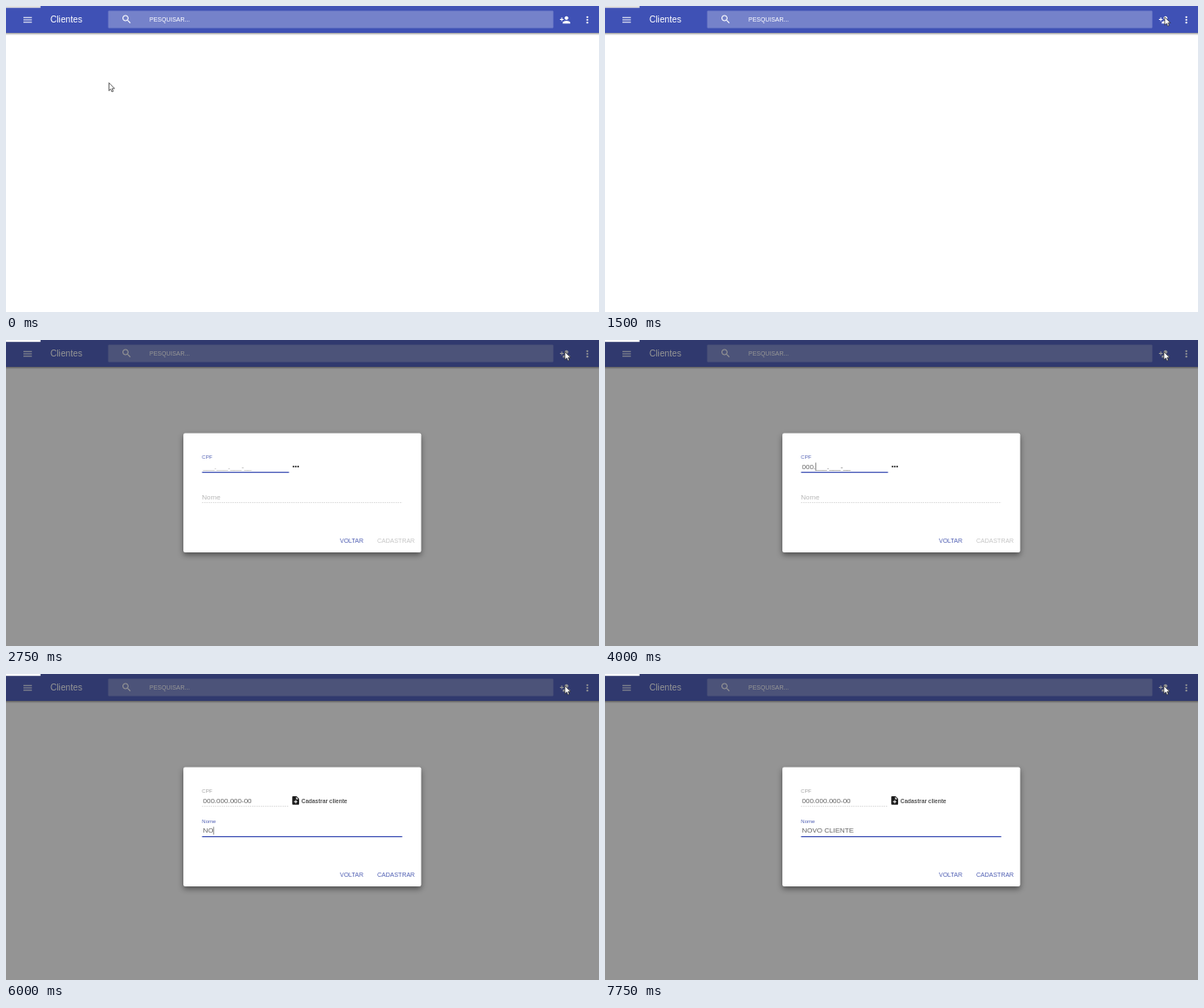
These frames come from a looping animation (682 by 353 pixels, 8 s). An HTML page:

```html
<!DOCTYPE html>
<html lang="pt-BR">
<head>
<meta charset="utf-8">
<title>Clientes</title>
<style>
  html, body { margin: 0; width: 100%; height: 100%; overflow: hidden; background: #fff; }
  svg { display: block; width: 100%; height: 100%; font: 8px "Liberation Sans", Arial, sans-serif; }
  .bar { fill: #3f51b5; filter: drop-shadow(0 1px 1.3px rgba(0, 0, 0, .5)); }
  .card { fill: #fff; filter: drop-shadow(0 3px 3px rgba(0, 0, 0, .45)); }
  .label { font-size: 6px; fill: #a0a0a0; }
  .value { fill: #666; }
  .mask { fill: #999; }
  .button { font-size: 7px; fill: #5261b4; }
  .line { fill: none; stroke: #cfcfcf; stroke-width: .8; stroke-dasharray: 1.5 1; }
  .line.focus { stroke: #3f51b5; stroke-width: 1.2; stroke-dasharray: none; }
  .label.focus { fill: #5261b4; }
  .button.disabled { fill: #c6c6c6; }
  .placeholder { fill: #b8b8b8; }
  .caret { stroke: #555; stroke-width: .7; }
</style>
</head>
<body>
<svg viewBox="0 0 682 353">
  <rect class="bar" x="-5" y="-5" width="692" height="36"/>
  <rect x="117.5" y="5.5" width="512" height="20" rx="1" fill="#fff" fill-opacity=".28"/>
  <g fill="#fff">
    <path transform="translate(18.4 9.5) scale(.54)" d="M3 18h18v-2H3zM3 13h18v-2H3zM3 6v2h18V6z"/>
    <text x="51" y="19.2" font-size="10.2">Clientes</text>
    <path transform="translate(132.3 8.9) scale(.54)" d="M15.5 14h-.79l-.28-.27C15.41 12.59 16 11.11 16 9.5 16 5.91 13.09 3 9.5 3S3 5.91 3 9.5 5.91 16 9.5 16c1.61 0 3.09-.59 4.23-1.57l.27.28v.79l5 4.99L20.49 19zm-6 0C7.01 14 5 11.99 5 9.5S7.01 5 9.5 5 14 7.01 14 9.5 11.99 14 9.5 14z"/>
    <text x="165" y="18" font-size="6.95">PESQUISAR...</text>
    <path transform="translate(636.5 9.5) scale(.54)" d="M15 12c2.21 0 4-1.79 4-4s-1.79-4-4-4-4 1.79-4 4 1.79 4 4 4zM6 10V7H4v3H1v2h3v3h2v-3h3v-2zm9 4c-2.67 0-8 1.34-8 4v2h16v-2c0-2.66-5.33-4-8-4z"/>
    <circle cx="668.6" cy="12.8" r="1.1"/>
    <circle cx="668.6" cy="16" r="1.1"/>
    <circle cx="668.6" cy="19.2" r="1.1"/>
  </g>

  <g id="overlay">
    <rect width="682" height="353" fill="#212121" fill-opacity=".48"/>
    <g id="dialog">
      <rect class="card" x="204" y="107.5" width="273.5" height="137.5" rx="2"/>
      <text id="cpfLabel" class="label" x="225.3" y="136.7">CPF</text>
      <text id="cpf" x="226.5" y="148.5"></text>
      <path id="cpfLine" class="line" d="M225.5 152.6H325.5"/>
      <g id="dots" fill="#222">
        <circle cx="330.6" cy="146" r="1"/>
        <circle cx="333.3" cy="146" r="1"/>
        <circle cx="336" cy="146" r="1"/>
      </g>
      <path id="iconPart" fill="#333" d="M330 146.8Q332.5 143.6 335 146.8ZM336 145.2h1.5v1.5h-1.5z"/>
      <path id="noteIcon" fill="#1a1a1a" transform="translate(327.3 140) scale(.49)" d="M14 2H6c-1.1 0-2 .9-2 2v16c0 1.1.9 2 2 2h12c1.1 0 2-.9 2-2V8zm2 14h-3v3h-2v-3H8v-2h3v-3h2v3h3zm-3-7V3.5L18.5 9z"/>
      <text id="status" x="339.7" y="149.2" font-size="6.5" font-weight="bold" fill="#555">Cadastrar cliente</text>
      <text id="nameLabel" class="label focus" x="225.3" y="171.9">Nome</text>
      <text id="placeholder" class="placeholder" x="225.3" y="184.3">Nome</text>
      <text id="name" class="value" x="226.5" y="183.4"></text>
      <path id="nameLine" class="line" d="M225.5 187.6H455.7"/>
      <path id="caret" class="caret"/>
      <text class="button" x="384" y="234.3">VOLTAR</text>
      <text id="submit" class="button" x="427" y="234.3">CADASTRAR</text>
    </g>
  </g>

  <rect id="tab" width="39.7" height="2.2"/>
  <path id="cursor" fill="#fff" stroke="#222" stroke-width=".7" d="M0 0V9.2L2.1 7.2 3.5 10.4 5 9.7 3.7 6.6H6.4Z"/>
</svg>
<script>
const ui = Object.fromEntries([...document.querySelectorAll('[id]')].map(el => [el.id, el]));
const LOOP = 8000, TICK = 250;
const CPF = '000.000.000-00', MASK = '___.___.___-__', NAME = 'NOVO CLIENTE';

// Each track lists [start time, value]; the latest started entry holds.
const cursorTrack = [[0, [118.4, 88.6]], [250, [180, 125]], [500, [330, 139]], [750, [500, 110]],
  [1000, [610, 45]], [1250, [643.8, 12.8]], [2750, [642.8, 13.6]]];
const cpfTrack = [[0, 0], [4000, 4], [4250, 9], [4500, 14]];
const nameTrack = [[0, 0], [6000, 2], [6250, 4], [6500, 6], [6750, 9], [7000, 12]];
const caretTrack = [[0, false], [2250, true], [2750, false], [3250, true], [3500, false], [4000, true],
  [5500, false], [6000, true], [7250, false], [7500, true], [7750, false]];

const at = (track, t) => track.findLast(([start]) => start <= t)[1];
const show = (el, on) => { el.style.display = on ? '' : 'none'; };
const setText = (el, text) => { if (el.textContent !== text) el.textContent = text; };

function render(t) {
  const open = t >= 1750, opening = open && t < 2000;
  const onName = t >= 4750, onCpf = t >= 2000 && !onName;
  const typedCpf = at(cpfTrack, t), typedName = at(nameTrack, t);

  ui.cursor.setAttribute('transform', `translate(${at(cursorTrack, t)})`);
  ui.tab.setAttribute('fill', open ? '#fff' : '#dedede');
  show(ui.overlay, open);
  ui.dialog.setAttribute('transform',
    opening ? 'translate(340.8 176.2) scale(.98) translate(-340.8 -176.2)' : '');
  ui.dialog.setAttribute('opacity', opening ? .96 : 1);

  setText(ui.cpf, CPF.slice(0, typedCpf) + MASK.slice(typedCpf));
  ui.cpf.setAttribute('class', typedCpf ? 'value' : 'mask');
  setText(ui.name, NAME.slice(0, typedName));
  for (const el of [ui.cpfLabel, ui.cpfLine]) el.classList.toggle('focus', onCpf);
  ui.nameLine.classList.toggle('focus', onName);
  ui.submit.classList.toggle('disabled', !typedName);

  show(ui.nameLabel, onName);
  show(ui.placeholder, !onName);
  show(ui.status, onName);
  show(ui.dots, !onName);
  show(ui.iconPart, onName && t < 5000);
  show(ui.noteIcon, t >= 5000);

  show(ui.caret, open && at(caretTrack, t));
  if (open) {
    const field = onName ? ui.name : ui.cpf;
    const count = onName ? typedName : typedCpf;
    const x = 226.8 + (count ? field.getSubStringLength(0, count) : 0);
    ui.caret.setAttribute('d', `M${x} ${onName ? 176.3 : 141.5}v9`);
  }
}

function frame(now) {
  render(Math.floor(now % LOOP / TICK) * TICK);
  requestAnimationFrame(frame);
}
render(0);
requestAnimationFrame(frame);
</script>
</body>
</html>
```
